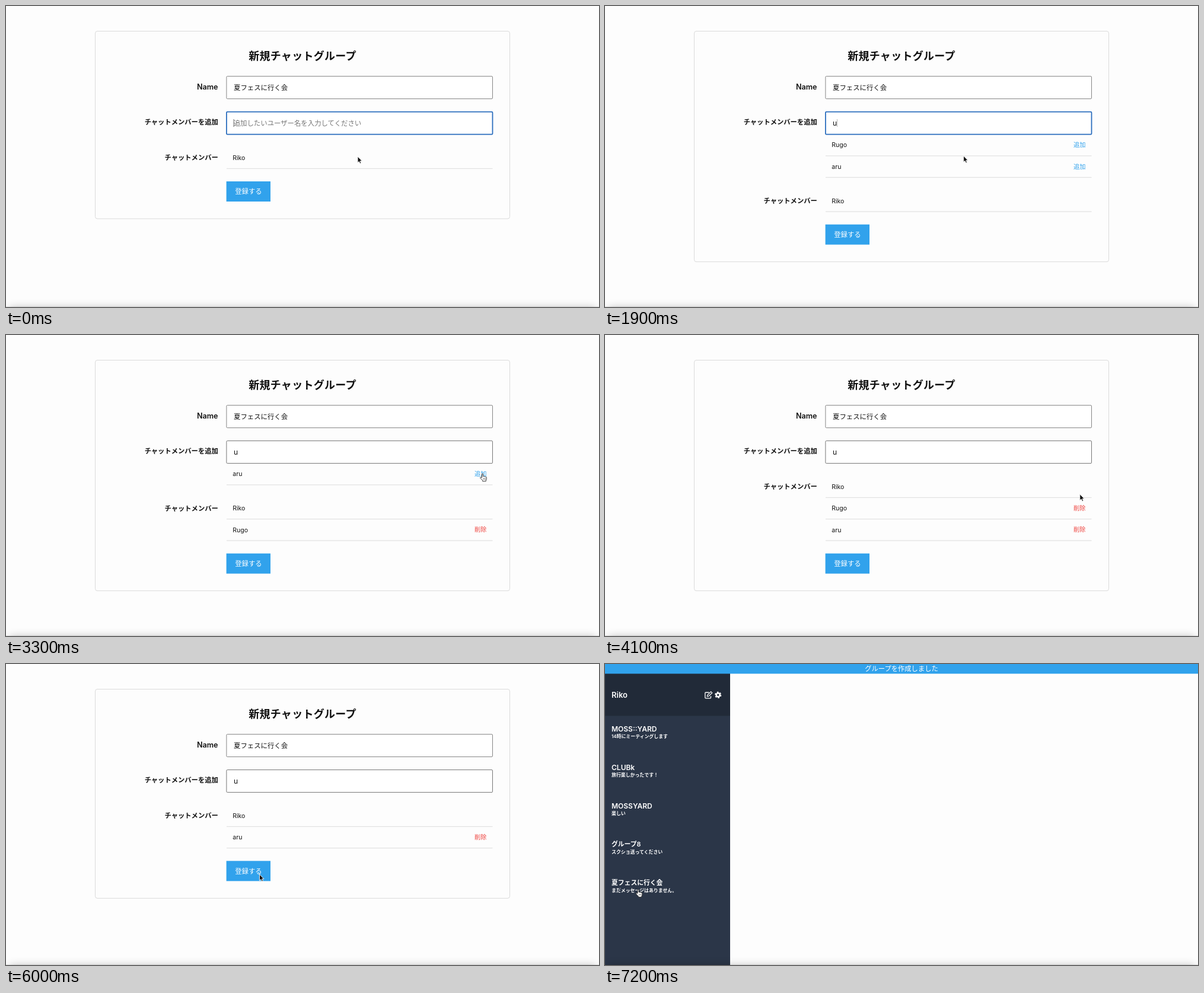
An HTML page that plays this animation: 1000x508 px, repeating every 7.3 s.

```html
<!DOCTYPE html>
<html lang="ja">
<head>
<meta charset="utf-8">
<title>新規チャットグループ</title>
<style>
  html, body { margin: 0; width: 100%; height: 100%; overflow: hidden; background: #fdfdfd; }
  svg { display: block; width: 100vw; height: 100vh; }
  text { font-family: Inter, 'Noto Sans CJK JP', 'Noto Sans CJK', sans-serif; white-space: pre; }
</style>
</head>
<body>
<svg viewBox="0 0 1000 508">
  <defs>
    <filter id="soft" x="-5%" y="-100%" width="110%" height="300%"><feGaussianBlur stdDeviation="7"/></filter>
    <g id="arrow">
      <path d="M0 0V10.6L2.4 8.4 4 12.1 5.9 11.3 4.3 7.7H7.5Z" fill="#111" stroke="#fff" stroke-width=".9"/>
    </g>
    <g id="hand" fill="#fff" stroke="#222" stroke-width=".9" stroke-linejoin="round">
      <path d="M-1 6.7V1Q-1 0 0 0T1 1V4.6Q2.1 3.9 3 5 4.2 4.4 5 5.5 6.8 5 6.8 6.8V8.8Q6.8 10 5.8 11V12.8H.2V11.4L-3.6 7.4Q-4.2 6 -2.7 6Z"/>
      <path d="M1.5 7.6V10M3.2 7.6V10M4.9 7.6V10" fill="none" stroke-width=".6"/>
    </g>
  </defs>
  <g id="page"></g>
  <rect x="6" y="508" width="988" height="30" opacity=".22" filter="url(#soft)"/>
  <rect y="507" width="1000" height="1" opacity=".1"/>
  <use id="pointer"/>
</svg>
<script>
const LOOP = 7300, TICK = 100, ROW = 36.35;
const BLUE = '#31a2ec', RED = '#ee423d';
const ME = 'Riko', FIRST = 'Rugo', SECOND = 'aru', GROUP = '夏フェスに行く会';
const page = document.getElementById('page');
const pointer = document.getElementById('pointer');

const GROUPS = [
  ['MOSS::YARD', '14時にミーティングします'],
  ['CLUBk', '旅行楽しかったです！'],
  ['MOSSYARD', '楽しい'],
  ['グループ8', 'スクショ送ってください'],
  [GROUP, 'まだメッセージはありません。']
];

// time, x, y
const PATH = [
  [1800, 593, 254], [2500, 803, 235], [2600, 803.5, 234], [3700, 803.5, 234],
  [4400, 799, 291], [4600, 796.5, 289], [5200, 796.5, 289], [5800, 434, 367],
  [6000, 427.5, 355], [6200, 427.5, 355], [6900, 56, 380.5]
];

// Text centred vertically on cy
function text(x, cy, str, size, { fill = '#111', weight = 400, anchor = 'start', gap = 0 } = {}) {
  return `<text x="${x}" y="${cy + size * 0.37}" font-size="${size}" fill="${fill}" ` +
    `font-weight="${weight}" text-anchor="${anchor}" letter-spacing="${gap}">${str}</text>`;
}

function rect(x, y, w, h, fill, extra = '') {
  return `<rect x="${x}" y="${y}" width="${w}" height="${h}" fill="${fill}" ${extra}/>`;
}

function field(y, color, width) {
  return rect(371.9, y, 448.6, 38, '#fff', `rx="1.5" stroke="${color}" stroke-width="${width}"`);
}

function row(cy, name, action, color) {
  return text(382.3, cy, name, 10.5) + rect(372, cy + 17.8, 448.5, 1, '#dcdcdc') +
    (action ? text(810.4, cy, action, 10.2, { fill: color, anchor: 'end' }) : '');
}

function lists(t) {
  if (t < 1500) return { found: [], members: [] };
  if (t < 2800) return { found: [FIRST, SECOND], members: [] };
  if (t < 3700) return { found: [SECOND], members: [FIRST] };
  if (t < 5200) return { found: [], members: [FIRST, SECOND] };
  return { found: [], members: [SECOND] };
}

function caretAlpha(t) {
  const fade = end => Math.min(1, Math.max(0, (end - t) / 300));
  if (t < 700) return fade(200);
  if (t < 1400) return fade(1200);
  if (t < 2400) return fade(2000);
  return t < 2700 ? 1 : 0;
}

function form(t) {
  const { found, members } = lists(t);
  const shift = found.length * ROW;
  const grow = shift + members.length * ROW;
  const typed = t >= 1400, focus = t < 2700;
  const label = { weight: 700, anchor: 'end' };
  let s = rect(150.5, 42.5, 699, 316.5 + grow, 'none', 'rx="3.5" stroke="#dadada"');
  s += text(500, 84, '新規チャットグループ', 18, { weight: 700, anchor: 'middle', gap: 0.3 });
  s += text(357.5, 136, 'Name', 12.6, { weight: 600, anchor: 'end' });
  s += text(357.8, 196, 'チャットメンバーを追加', 11.3, label);
  s += text(357.8, 256 + shift, 'チャットメンバー', 11.3, label);
  s += field(118.6, '#858585', 1) + text(384, 137.7, GROUP, 11.4);
  s += focus ? field(178.7, '#2a6dbd', 1.8) : field(178.6, '#767676', 1);
  s += typed ? text(384, 197.5, 'u', 12)
    : text(383.7, 197.5, '追加したいユーザー名を入力してください', 11.4, { fill: '#757575' });
  s += rect(typed ? 391 : 383.6, 191, 0.9, 13, '#111', `opacity="${caretAlpha(t)}"`);
  found.forEach((name, i) => s += row(234.6 + i * ROW, name, '追加', BLUE));
  s += row(256 + shift, ME);
  members.forEach((name, i) => s += row(256 + shift + (i + 1) * ROW, name, '削除', RED));
  s += rect(371.6, 296 + grow, 74.4, 34, BLUE);
  return s + text(386.3, 313 + grow, '登録する', 11.3, { fill: '#fff' });
}

function home() {
  const white = { fill: '#fff', weight: 600 };
  let s = rect(0, 16, 211, 492, '#2b3648') + rect(0, 16, 211, 71.5, '#212a38');
  s += rect(0, 0, 1000, 16.4, BLUE);
  s += text(500, 8, 'グループを作成しました', 11.3, { fill: '#fff', anchor: 'middle' });
  s += text(11, 52, ME, 13, white);
  s += `<g fill="none" stroke="#fff">
    <path d="M175.5 48H170Q168.8 48 168.8 49V56.6Q168.8 57.8 170 57.8H177.4Q178.5 57.8 178.5 56.6V54" stroke-width="1.3"/>
    <path d="M172.3 54.8L172.7 52.5 178.6 46.6 180.7 48.7 174.7 54.5Z" stroke-width="1.2"/>
    <circle cx="190.7" cy="52.2" r="3" stroke-width="2.5"/>
    <circle cx="190.7" cy="52.2" r="4.7" stroke-width="1.8" stroke-dasharray="2.6 2.32"/>
  </g>`;
  GROUPS.forEach(([name, note], i) => {
    const y = 110 + i * 64.8;
    s += text(11, y, name, /^[A-Z]/.test(name) ? 12 : 10.8, white);
    s += text(11, y + 12.5, note, 7.9, white);
  });
  return s;
}

function pointerAt(t) {
  let a = PATH[0];
  for (const b of PATH) {
    if (t <= b[0]) {
      const u = Math.min(1, Math.max(0, (t - a[0]) / (b[0] - a[0] || 1)));
      const k = u * u * (3 - 2 * u);
      return [a[1] + (b[1] - a[1]) * k, a[2] + (b[2] - a[2]) * k];
    }
    a = b;
  }
  return [a[1], a[2]];
}

function overLink(t, x, y) {
  if (t >= 6200) return x < 211 && y > 88;
  if (x < 789 || x > 811) return false;
  const { found, members } = lists(t);
  const hit = (cy, n) => Array.from({ length: n }).some((_, i) => Math.abs(y - cy - i * ROW) < 7);
  return hit(234.6, found.length) || hit(256 + (found.length + 1) * ROW, members.length);
}

function draw(t) {
  page.innerHTML = t < 6200 ? form(t) : home();
  const [x, y] = pointerAt(t);
  pointer.setAttribute('href', overLink(t, x, y) ? '#hand' : '#arrow');
  pointer.setAttribute('transform', `translate(${x} ${y})`);
  pointer.setAttribute('visibility', t < 1400 || t >= 1900 ? 'visible' : 'hidden');
}

const start = performance.now();
let last = -1;
function frame() {
  const t = Math.floor(((performance.now() - start) % LOOP) / TICK) * TICK;
  if (t !== last) draw(last = t);
  requestAnimationFrame(frame);
}
frame();
</script>
</body>
</html>
```
